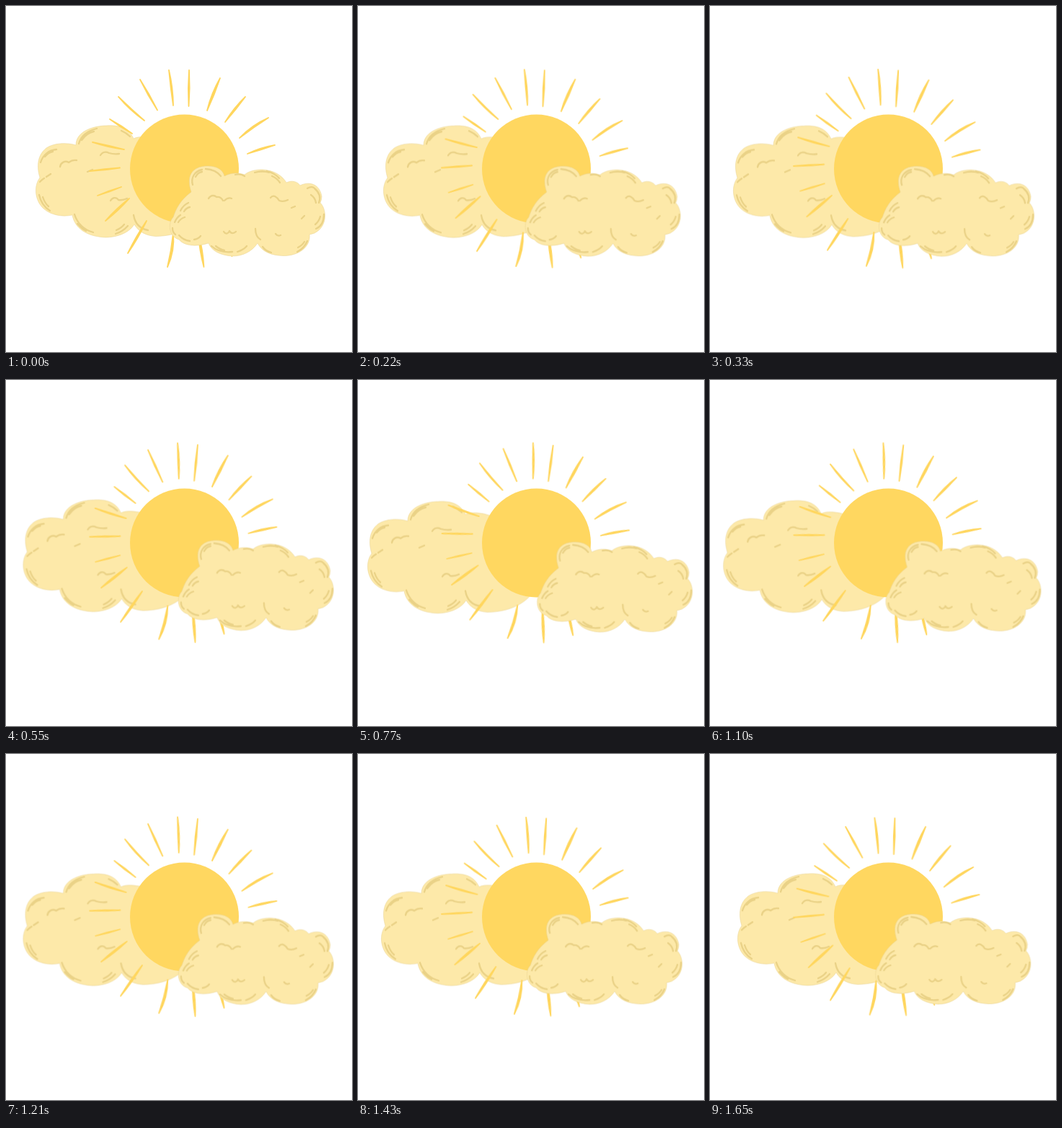
These frames come from a looping animation (480 by 480 pixels, 1.76 s). An HTML page:

```html
<!DOCTYPE html>
<html lang="en">
<head>
<meta charset="utf-8">
<title>Sun and clouds</title>
<style>
  html, body { margin: 0; width: 100%; height: 100%; overflow: hidden; background: #fff; }
  svg { display: block; width: 100vw; height: 100vh; }
  .puff { fill: #fde9a9; stroke: #e6d091; stroke-width: .5; }
  .lines { fill: none; stroke: #ead287; stroke-width: 2.3; stroke-linecap: round; stroke-linejoin: round; }
  #rays { fill: #ffd65e; stroke: #ffd65e; stroke-width: 1.8; stroke-linejoin: round;
    transform-origin: 247.5px 226px; animation: turn 1760ms steps(8) infinite; }
  #back { animation: back 1760ms infinite; }
  #front { animation: front 1760ms infinite; }

  @keyframes turn { 0%, 100% { transform: rotate(0deg); } 50% { transform: rotate(8deg); } }
  @keyframes back {
    0% { transform: translate(0, 0); animation-timing-function: steps(3); }
    18.75% { transform: translate(-9px, .4px); animation-timing-function: steps(2); }
    31.25% { transform: translate(-17.5px, .4px); animation-timing-function: steps(2); }
    43.75% { transform: translate(-28px, 2.6px); animation-timing-function: steps(1); }
    50% { transform: translate(-29px, 2.8px); animation-timing-function: steps(1); }
    56.25% { transform: translate(-28px, 2.6px); animation-timing-function: steps(2); }
    68.75% { transform: translate(-17.5px, .4px); animation-timing-function: steps(2); }
    81.25% { transform: translate(-9px, .4px); animation-timing-function: steps(3); }
    100% { transform: translate(0, 0); }
  }
  @keyframes front {
    0% { transform: translate(0, 0); animation-timing-function: steps(5); }
    31.25% { transform: translate(11.8px, .5px); animation-timing-function: steps(2); }
    43.75% { transform: translate(21.3px, 2.7px); animation-timing-function: steps(1); }
    50% { transform: translate(22.3px, 2.9px); animation-timing-function: steps(1); }
    56.25% { transform: translate(21.3px, 2.7px); animation-timing-function: steps(2); }
    68.75% { transform: translate(11.8px, .5px); animation-timing-function: steps(5); }
    100% { transform: translate(0, 0); }
  }
</style>
</head>
<body>
<svg viewBox="0 0 480 480">
  <g id="back">
    <path class="puff" d="M97 193C97 172 125 166 139 166C155 165 170 168 177 184C183 181 190 181 203 183
      L262 200L272 290C262 306 240 319 208 319.500C196 319 184 314 178 303C170 316 152 321 138 321
      C112 320 95 308 92 290C78 293 62 290 52 281C40 270 38 250 47 238C42 222 44 206 56 197C66 190 84 189 97 193Z"/>
    <path class="lines" d="M101 191C104 180 113 173 126 170M105 186Q112 176 122 174M160 173Q167 176 172 181
      M131 207C134 202 139 202 143 204Q150 206 157 205M75 223C76 217 82 214 87 217Q92 213 98 214
      M48 217C51 207 59 200 70 199M54 209Q59 203 65 202M56 237L62 233M113 230L120 227
      M47 244Q51 240 53 239M46 262C48 272 53 279 61 284M51 265Q54 274 59 278
      M95 289C99 302 109 311 121 314M99 302Q105 309 111 312M152 316Q162 313 169 305M153 311Q160 308 164 303
      M145 270C148 265 153 265 156 269Q162 270 168 267M177 290C179 302 186 309 197 311"/>
  </g>
  <g id="rays"></g>
  <circle cx="247.500" cy="226" r="75.500" fill="#ffd760"/>
  <g id="front">
    <path class="puff" d="M257 258C250 238 256 222 280 222C292 222 301 227 303 236C312 231 322 231 331 234
      C338 228 348 227 356 227C372 228 383 235 389 245C397 241 405 244 408 249C420 243 435 246 438 264
      Q438 269 436 273C444 281 446 300 434 311Q429 316 421 317C423 334 406 347 384 346.500
      C368 346 355 341 349 329C341 341 328 347 314 347C298 346 285 340 281 329C262 335 246 332 240 324
      C226 320 224 301 232 293C236 281 242 269 257 258Z"/>
    <path class="lines" d="M259 248C256 238 262 229 272 227M263 237Q266 231 272 230M277 226Q291 227 298 236
      M281 267C285 261 290 263 292 265Q298 264 301 270M303 270Q308 265 313 267M318 234Q325 232 331 236
      M345 231Q356 228 365 231M362 229Q373 232 379 239M369 236Q376 239 380 245
      M367 266C371 261 376 265 379 270Q385 272 391 269M396 280L401 278
      M428 253C434 258 437 265 434 273M423 262Q429 266 430 273M418 253Q423 250 427 252
      M441 289C441 299 437 306 430 309M436 292Q434 299 429 303M414 291L410 295
      M302 313C305 318 309 315 310 312C312 316 316 316 319 313M346 309Q346 320 353 324M374 316Q377 320 381 318
      M242 284Q246 276 253 273M247 285Q250 280 255 279M234 300Q237 293 242 290M239 300Q242 295 248 293
      M231 308Q231 314 235 317M240 318Q246 325 255 326M261 324Q267 323 270 319
      M285 333Q296 343 314 341M291 333Q297 338 303 339M321 341Q330 338 334 333
      M356 334Q360 340 368 342M404 341Q414 336 418 326M405 335Q411 332 414 327"/>
  </g>
</svg>
<script>
  // outer end, inner end, thickness, bend
  const rays = [
    [226, 89, 232, 138, 3.5, -1], [254, 89, 253.5, 139, 3.5, 0], [297, 100, 279, 145, 5, 1],
    [332, 126, 304, 161, 4, 1], [364, 155, 324, 183, 4, 3], [373, 193, 335, 205, 3.5, 1],
    [156, 126, 192, 159, 2.5, 2], [186, 102, 210, 144.5, 3, 0], [144, 157, 175, 177, 3, 0],
    [120, 189, 164, 199, 3, 1], [116, 229, 158, 224.5, 2.5, 0], [127, 263, 160, 251, 2.5, 0],
    [138, 298, 171, 267, 4.5, 0], [169, 343, 195, 298, 4, 0], [224, 362, 232, 315, 5, 4],
    [274.5, 362, 267, 316, 5, 0], [313.5, 347, 302, 314, 4, 0]
  ];

  const rayPath = ([x1, y1, x2, y2, w, bend]) => {
    const len = Math.hypot(x2 - x1, y2 - y1);
    const nx = (y1 - y2) / len, ny = (x2 - x1) / len;
    const side = k => `${(x1 + x2) / 2 + nx * k} ${(y1 + y2) / 2 + ny * k}`;
    return `<path d="M${x1} ${y1}Q${side(bend + w / 2)} ${x2} ${y2}Q${side(bend - w / 2)} ${x1} ${y1}Z"/>`;
  };
  document.getElementById('rays').innerHTML = rays.map(rayPath).join('');
</script>
</body>
</html>
```
